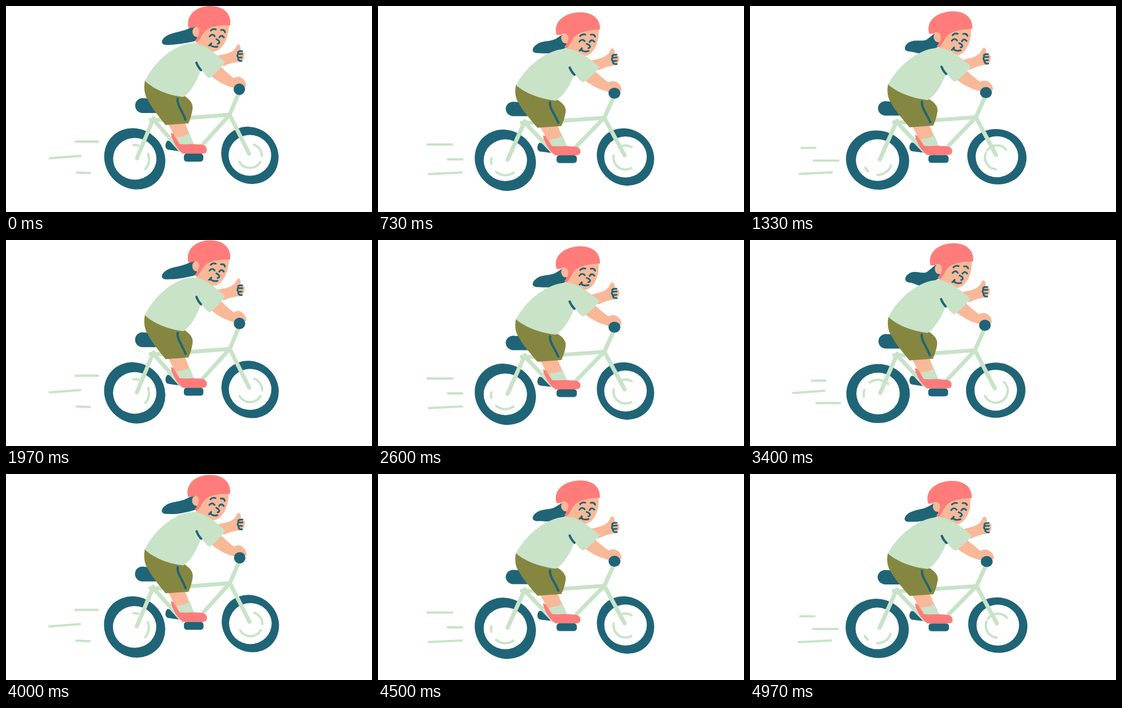
An HTML page that plays this animation: 640 px wide and 360 px high, repeating every 5000 ms.

```html
<!DOCTYPE html>
<html lang="en">
<head>
<meta charset="utf-8">
<title>Cyclist</title>
<style>
  html, body { margin: 0; width: 100%; height: 100%; overflow: hidden; background: #fff; }
  svg { display: block; width: 100vw; height: 100vh; }
  .teal { fill: #1f6577; }
  .mint { fill: #c8e3c8; }
  .skin { fill: #f9b898; }
  .pink { fill: #ff7c7a; }
  .olive { fill: #858740; }
  .line { fill: none; stroke-linecap: round; stroke-linejoin: round; }
  .ink { stroke: #1f6577; stroke-width: 3; }
  .bold { stroke-width: 4; }
  .tube { stroke: #c8e3c8; stroke-width: 7; }
  .dash { stroke: #c8e3c8; stroke-width: 4; }
</style>
</head>
<body>
<svg viewBox="0 0 640 360">
  <g id="wheels"></g>
  <g id="scene">
    <path id="speed" class="line dash"/>

    <path class="teal" d="M283 235L304 243L304 254L283 251C277 249 278 238 283 235Z"/>
    <path class="pink" d="M286 236L292 221L310 244L300 245Z"/>

    <path class="line tube" d="M229 266L258 196M253 199H275L391 190M258 199L305 252M391 190L345 241M407 152L391 190L425 258"/>
    <path class="teal" d="M238 161L265 163L264 187L237 187C222 184 222 163 238 161Z"/>

    <path class="skin" d="M282 203L311 200L324 232L300 238Z"/>
    <path class="mint" d="M299 229Q312 229 321 222L329 243L304 245Z"/>
    <path class="pink" d="M288 222C292 221 298 233 303 241C314 243 327 240 334 242C346 241 352 245 351 253Q350 258 343 258H309C299 250 292 238 288 222Z"/>
    <rect class="teal" x="311" y="258" width="34" height="14" rx="5"/>

    <path class="olive" d="M243 130L310 156C322 163 328 171 326 181Q324 194 319 205L279 208C268 194 256 180 249 166Q239 152 243 130Z"/>
    <path class="line ink bold" d="M300 162C299 173 307 181 314 199"/>

    <g id="thumb">
      <path class="skin" d="M368 87C380 84 390 84 397 78C403 74 402 68 407 67Q411 68 410 78L417 82L416 92L409 98Q396 98 380 105Z"/>
      <path class="line ink" d="M413 79Q404 78 406 83Q403 87 406 90Q405 95 410 96M407 84H413M406 90H412M410 96H412"/>
    </g>

    <path id="pony" class="teal"/>
    <g id="head">
      <path class="skin" d="M335 36L390 30C390 48 386 62 377 72C368 82 357 81 349 77L347 88L332 72L334 55Z"/>
      <ellipse class="skin" cx="333" cy="45" rx="7" ry="9"/>
      <path class="pink" d="M319 38C314 14 335 0 357 0C382 0 395 15 392 34C376 33 358 35 349 43C343 49 341 57 334 63L330 61C336 54 339 48 338 42C336 35 330 35 327 38Z"/>
      <path class="line ink" d="M356 53q5 -6 9 0M373 55q4 -6 8 0M358 43q4 -4 9 -2M376 42q6 -1 7 4M368 58q6 3 5 6q-1 2 -3 2M355 69q4 0 4 -4M357 67q4 6 13 4"/>
    </g>

    <path class="skin" d="M374 105C384 114 391 121 398 126Q404 122 411 125Q420 130 420 141L402 144C384 140 370 132 356 120Z"/>
    <path class="mint" d="M243 131C258 99 295 65 328 65C347 66 367 83 383 98Q372 115 356 126C350 124 346 117 341 110C335 130 322 152 310 159C284 156 259 146 243 131Z"/>
    <path class="line ink bold" d="M333 99Q336 107 341 112"/>
    <circle class="teal" cx="408" cy="145.5" r="10"/>
  </g>
</svg>
<script>
const LOOP = 5000, CYCLE = 5600 / 3, SLOT = CYCLE / 14;
const byId = id => document.getElementById(id);

// [time, value] pairs over one bounce
const SQUASH = [[0, 0], [267, .12], [580, .58], [732, .92], [1000, 1], [1237, 1], [1333, .77], [1533, .47], [1600, .3], [CYCLE, 0]];
const WAVE = [[0, 0], [267, .15], [732, .4], [1000, .4], [1237, .2], [1333, .8], [1533, 1], [CYCLE, 0]];

// Spoke arcs are [from, to] in degrees around each hub
const ORDER = 'ADABDBCADCADBC';
const POSES = {
  A: { tilt: 45, speed: 'M122 237H161M77 266L130 262M124 291L147 292', rear: [[-22, 42], [-95, -75]], front: [[30, 150], [-70, 0]] },
  B: { tilt: 45, speed: 'M95 238.4H136M129 265.3H153M97 292L152 289', rear: [[55, 130], [168, 190]], front: [[62, 190], [250, 300]] },
  C: { tilt: 15, speed: 'M97 245H120M118 268H159M94 292L148 289', rear: [[20, 90], [132, 150]], front: [[95, 200], [215, 320]] },
  D: { tilt: 0, speed: 'M112 244H135M80 266L133 262M120 284H160', rear: [[-125, -45], [170, 197]], front: [[20, 155], [-45, 15]] }
};

const WHEELS = [
  { name: 'rear', x: 225.2, y: 267, rx: 55.5, ry: 51.5, hole: 37.5, arc: 25 },
  { name: 'front', x: 426.5, y: 261, rx: 52, ry: 48.2, hole: 36.8, arc: 21 }
];

function make(tag, attrs) {
  const el = document.createElementNS('http://www.w3.org/2000/svg', tag);
  for (const key in attrs) el.setAttribute(key, attrs[key]);
  return el;
}

for (const w of WHEELS) {
  w.group = make('g', {});
  w.tyre = make('ellipse', { class: 'teal', rx: w.rx, ry: w.ry });
  w.inside = make('ellipse', { fill: '#fff', rx: w.hole + .4, ry: w.hole - 1 });
  w.spokes = make('path', { class: 'line dash', transform: 'translate(0 1)' });
  w.group.append(w.tyre, w.inside, w.spokes);
  byId('wheels').append(w.group);
}

function sample(keys, t) {
  const i = Math.max(1, keys.findIndex(k => k[0] >= t));
  const [t0, a] = keys[i - 1], [t1, b] = keys[i];
  return a + (b - a) * (t - t0) / (t1 - t0);
}

function arc(r, [from, to]) {
  const point = deg => {
    const a = deg * Math.PI / 180;
    return `${(r * Math.cos(a)).toFixed(1)} ${(r * Math.sin(a)).toFixed(1)}`;
  };
  return `M${point(from)}A${r} ${r} 0 0 1 ${point(to)}`;
}

function ponytail(k) {
  return `M334 36C322 36 319 ${41 + 3 * k} 309 ${43 + 7 * k}` +
    `C300 ${46 + 6 * k} 290 ${47 - 2 * k} 281 ${52 - 2 * k}` +
    `C271 ${58 - 3 * k} 269 ${68 - 2 * k} 281 ${68 - k}` +
    `C292 ${68 + 2 * k} 297 ${67 + 9 * k} 306 ${66 + 7 * k}` +
    `C317 ${64 + 5 * k} 326 63 334 60Z`;
}

function draw(time) {
  const t = (time % LOOP) % CYCLE;
  const u = sample(SQUASH, t);
  const slot = Math.floor((t + 1) / SLOT) % ORDER.length;
  const pose = POSES[ORDER[slot]];
  const sx = 1 + .0475 * u, sy = 1 - .038 * u;
  const dx = -13.44 * u, dy = 13 * u;
  const nod = `rotate(${-5 * u} 345 85)`;

  byId('scene').setAttribute('transform', `matrix(${sx} 0 0 ${sy} ${dx} ${dy})`);
  byId('head').setAttribute('transform', `translate(${-4.5 * u} 0) ${nod}`);
  byId('pony').setAttribute('transform', nod);
  byId('thumb').setAttribute('transform', `rotate(${-5 * u} 372 96)`);
  byId('pony').setAttribute('d', ponytail(sample(WAVE, t)));
  byId('speed').setAttribute('d', pose.speed);

  for (const w of WHEELS) {
    w.group.setAttribute('transform', `translate(${w.x * sx + dx} ${w.y * sy + dy})`);
    w.tyre.setAttribute('transform', `rotate(${pose.tilt})`);
    w.spokes.setAttribute('d', pose[w.name].map(a => arc(w.arc, a)).join(''));
  }
}

const start = performance.now();
function tick() {
  draw(performance.now() - start);
  requestAnimationFrame(tick);
}
tick();
</script>
</body>
</html>
```
